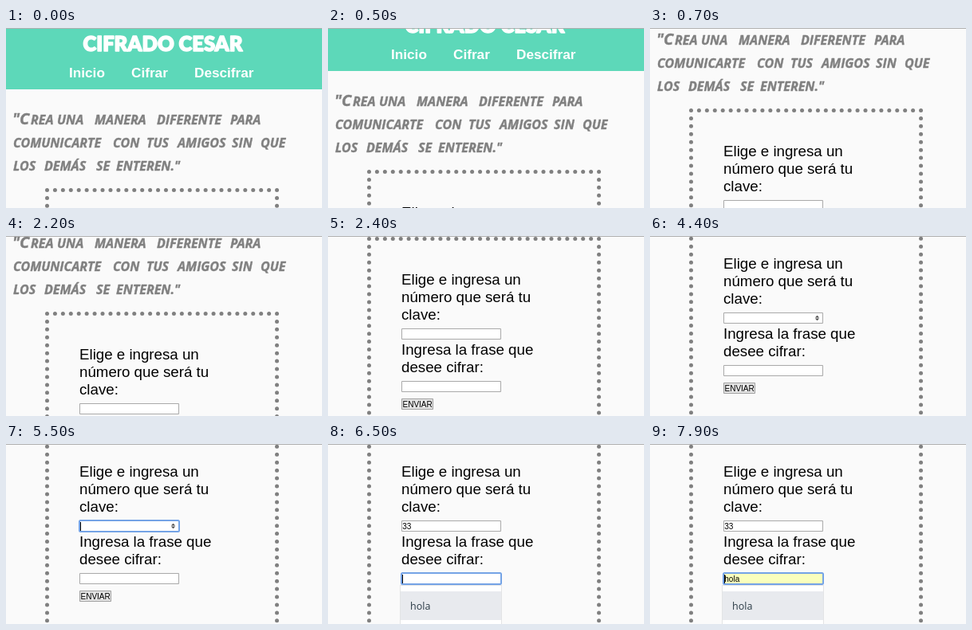
Write an HTML page with a canvas that moves like this. It is 396 px wide and 226 px high and loops after 8000 ms.

```html
<!DOCTYPE html>
<html lang="es">
<head>
<meta charset="utf-8">
<title>Cifrado Cesar</title>
<style>
  html, body { margin: 0; width: 100%; height: 100%; overflow: hidden; background: #fafafa; }
  canvas { display: block; width: 396px; height: 226px; }
</style>
</head>
<body>
<canvas id="stage" width="396" height="226"></canvas>
<script>
const ctx = document.getElementById('stage').getContext('2d');
const W = 396, H = 226, LOOP = 8000;
const ARIAL = '"Liberation Sans", Arial, sans-serif';
const GRAY = '#808080';

// [time, value] steps; each value holds until the next one
const scrollSteps = [
  [0, 0], [500, 23], [600, 82], [700, 100],
  [2200, 106], [2300, 158], [2400, 200],
  [3400, 207], [3500, 220]
];
const keySteps = [[0, ''], [5600, '3'], [5700, '33']];
const caretSteps = [
  [0, false], [4600, true], [5000, false], [5500, true],
  [6200, false], [6400, true], [6900, false], [7400, true]
];

const valueAt = (steps, t) => steps.filter(([start]) => start <= t).pop()[1];

function rect(x, y, w, h, color) {
  ctx.fillStyle = color;
  ctx.fillRect(x, y, w, h);
}

function frame(x, y, w, h, color) {
  ctx.strokeStyle = color;
  ctx.lineWidth = 1;
  ctx.strokeRect(x + 0.5, y + 0.5, w - 1, h - 1);
}

function text(str, x, y, font, color, outline = 0) {
  ctx.font = font;
  ctx.fillStyle = ctx.strokeStyle = color;
  ctx.fillText(str, x, y);
  if (outline) {
    ctx.lineWidth = outline;
    ctx.lineJoin = 'round';
    ctx.strokeText(str, x, y);
  }
}

function drawHeader() {
  rect(0, 0, W, 77, '#5dd8b9');
  ctx.textAlign = 'center';
  text('CIFRADO CESAR', 196.5, 29, '900 25.5px Lato, sans-serif', '#fff', 1.4);
  ctx.textAlign = 'left';
  const font = `bold 17.2px ${ARIAL}`;
  text('Inicio', 79, 62, font, '#fff');
  text('Cifrar', 157, 62, font, '#fff');
  text('Descifrar', 236, 62, font, '#fff');
}

function drawQuote() {
  const marker = size => `italic bold ${size}px "Open Sans", sans-serif`;
  const lines = [
    [['REA', 31], ['UNA', 64], ['MANERA', 111], ['DIFERENTE', 189], ['PARA', 281]],
    [['COMUNICARTE', 9], ['CON', 134], ['TUS', 176], ['AMIGOS', 215], ['SIN', 283], ['QUE', 319]],
    [['LOS', 9], ['DEMÁS', 48], ['SE', 113], ['ENTEREN."', 138]]
  ];
  text('"C', 8, 120.5, marker(20), GRAY, 0.4);
  lines.forEach((words, row) => {
    for (const [word, x] of words) text(word, x, 120.5 + row * 29, marker(16), GRAY, 0.4);
  });
}

function dot(x, y) {
  ctx.beginPath();
  ctx.arc(x, y, 2.5, 0, Math.PI * 2);
  ctx.fill();
}

function drawDottedBox() {
  const left = 51.5, right = 339.5, top = 203.5, gap = 288 / 29;
  ctx.fillStyle = GRAY;
  for (let i = 0; i < 30; i++) {
    dot(left + i * gap, top);
    if (i) {
      dot(left, top + i * gap);
      dot(right, top + i * gap);
    }
  }
}

function drawField(y, { value = '', focus = false, caret = false, caretX = 93, fill = '#fff' }) {
  rect(92, y, 125, 14, fill);
  frame(92, y, 125, 14, '#a9a9a9');
  if (focus) {
    ctx.strokeStyle = '#74a3e6';
    ctx.lineWidth = 2;
    ctx.beginPath();
    ctx.roundRect(92, y, 125, 14, 1.5);
    ctx.stroke();
  }
  text(value, 93.3, y + 11, `10px ${ARIAL}`, '#000');
  if (caret) rect(caretX, y + 2, 1, 11, '#000');
}

function drawSpinner(y) {
  ctx.fillStyle = '#505050';
  for (const dir of [-1, 1]) {
    const base = y + dir * 0.4;
    ctx.beginPath();
    ctx.moveTo(206.8, base);
    ctx.lineTo(212.2, base);
    ctx.lineTo(209.5, base + dir * 2.8);
    ctx.fill();
  }
}

function drawForm(t) {
  const label = (str, y) => text(str, 92, y, `18.72px ${ARIAL}`, '#000');
  label('Elige e ingresa un', 261);
  label('número que será tu', 283);
  label('clave:', 305);
  label('Ingresa la frase que', 349);
  label('desee cifrar:', 371);

  const caret = valueAt(caretSteps, t);
  const onPhrase = t >= 6400, preview = t >= 7900;
  const onKey = t >= 4600 && !onPhrase;
  const key = valueAt(keySteps, t);
  drawField(316, { value: key, focus: onKey, caret: onKey && caret, caretX: 93 + Math.round(key.length * 5.56) });
  if (t >= 4400 && !onPhrase) drawSpinner(323);
  drawField(382, {
    value: preview ? 'hola' : '', focus: onPhrase, caret: onPhrase && caret,
    fill: preview ? '#faffbd' : '#fff'
  });

  rect(92, 404, 40, 14, '#e4e4e4');
  frame(92, 404, 40, 14, '#a0a0a0');
  text('ENVIAR', 93.5, 415, `10px ${ARIAL}`, '#000');
}

function drawSuggestions() {
  rect(90, 177, 128, H - 177, '#e3e4e5');
  rect(91, 178, 126, H - 178, '#fff');
  rect(91, 185, 126, 36, '#e8eaee');
  text('hola', 103, 208, '12.5px "Open Sans", sans-serif', '#2b3b46');
}

function draw(t) {
  rect(0, 0, W, H, '#fafafa');
  ctx.save();
  ctx.translate(0, -valueAt(scrollSteps, t));
  drawHeader();
  drawQuote();
  drawDottedBox();
  drawForm(t);
  ctx.restore();
  if (t >= 6500) drawSuggestions();
  rect(0, 0, W, 1, '#b0b0b0');
}

const start = performance.now();
function tick() {
  draw((performance.now() - start) % LOOP);
  requestAnimationFrame(tick);
}
tick();
</script>
</body>
</html>
```
